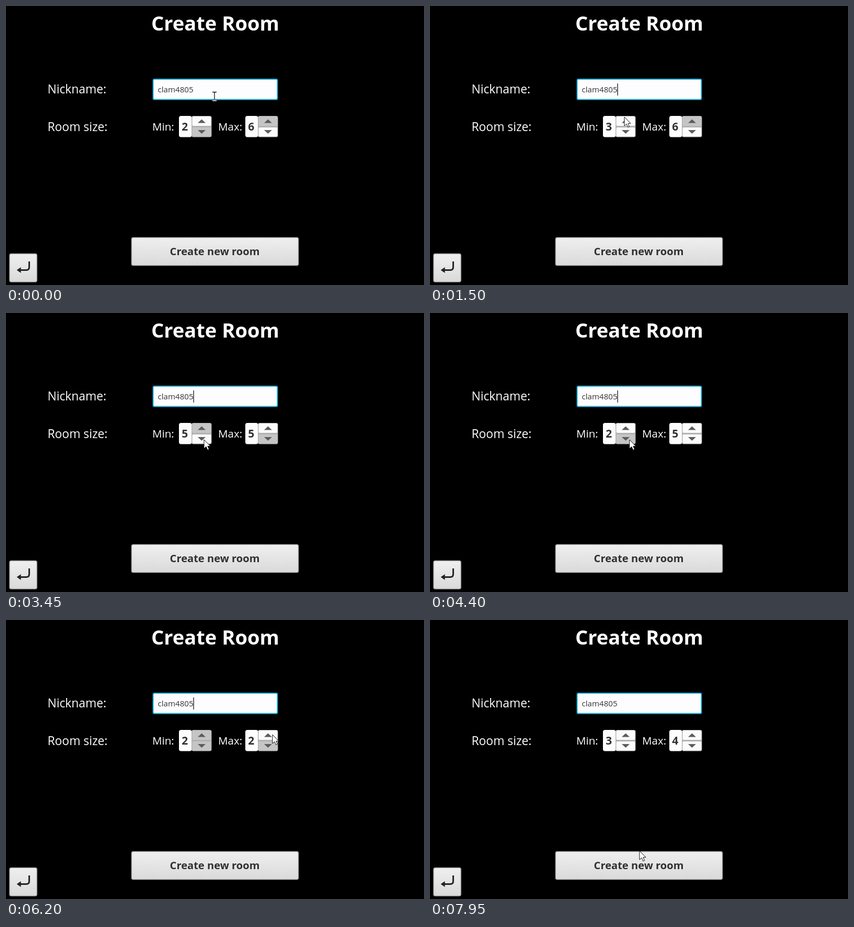
Animation of 800 by 533 pixels, one loop 8000 ms. Source, as an HTML page:

```html
<!DOCTYPE html>
<html lang="en">
<head>
<meta charset="utf-8">
<title>Create Room</title>
<style>
  html, body { margin: 0; width: 100%; height: 100%; overflow: hidden; background: #000; }
  svg { display: block; width: 100%; height: 100%; }
  text { font-family: "Open Sans", "Noto Sans", sans-serif; fill: #fff; }
  .title { font-size: 38.1px; font-weight: 700; }
  .label { font-size: 22.8px; }
  .bound { font-size: 20.5px; }
  .value { font-size: 21px; font-weight: 700; fill: #333; }
  .name { font-size: 15.1px; fill: #333; }
  .action { font-size: 20.1px; font-weight: 700; fill: #303030; }
  .mid { text-anchor: middle; }
  .step { fill: #fbfbfb; }
  .step.off { fill: #c5c5c5; }
  .arrow { fill: #5c5c5c; }
  .panel { fill: url(#face); stroke: #b2b2b2; stroke-width: 1.5; }
  #ibeam { mix-blend-mode: difference; }
</style>
</head>
<body>
<svg viewBox="0 0 800 533" preserveAspectRatio="none">
  <defs>
    <linearGradient id="face" x2="0" y2="1">
      <stop offset="0" stop-color="#efefef"/>
      <stop offset="1" stop-color="#dadada"/>
    </linearGradient>
    <g id="frame">
      <rect x="331" y="210" width="24.5" height="40.5" rx="4" fill="#fdfdfd"/>
      <rect x="355" y="210" width="38.5" height="40.5" rx="3.5" fill="#b3b3b3"/>
    </g>
    <g id="arrows" class="arrow">
      <path d="M367 223.5L374.5 216.5L382 223.5Z"/>
      <path d="M367 237L374.5 244L382 237Z"/>
    </g>
  </defs>

  <rect width="800" height="533"/>
  <text class="title mid" x="400.5" y="47">Create Room</text>

  <text class="label" x="79.5" y="167">Nickname:</text>
  <rect x="280.5" y="138.7" width="240" height="41" rx="3.5" fill="#1599c2"/>
  <rect x="281.5" y="139.7" width="238" height="39" rx="2.5" fill="#3cc1e4"/>
  <rect x="282.7" y="140.9" width="235.6" height="36.6" rx="1.5" fill="#fdfcfe"/>
  <text class="name" x="290.6" y="165">clam4805</text>
  <rect id="caret" x="358.4" y="148" width="1.4" height="23" fill="#222"/>

  <text class="label" x="79.5" y="239">Room size:</text>
  <text class="bound" x="280" y="238">Min:</text>
  <g id="min">
    <use href="#frame"/>
    <rect class="step" x="356.5" y="211" width="36" height="18" rx="2"/>
    <rect class="step" x="356.5" y="232" width="36" height="17.5" rx="2"/>
    <use href="#arrows"/>
    <text class="value mid" x="342.2" y="238"></text>
  </g>
  <text class="bound" x="406" y="238">Max:</text>
  <g id="max" transform="translate(127)">
    <use href="#frame"/>
    <rect class="step" x="356.5" y="211" width="36" height="18" rx="2"/>
    <rect class="step" x="356.5" y="232" width="36" height="17.5" rx="2"/>
    <use href="#arrows"/>
    <text class="value mid" x="342.2" y="238"></text>
  </g>

  <rect class="panel" x="240.5" y="442.5" width="319" height="53" rx="3"/>
  <text class="action mid" x="399.5" y="476">Create new room</text>

  <rect class="panel" x="7" y="473.5" width="52" height="53.5" rx="3"/>
  <path d="M44.4 488V499Q44.4 504.5 39 504.5H26" fill="none" stroke="#222" stroke-width="3"/>
  <path d="M20.5 504.5L28.5 499V510Z" fill="#222"/>

  <path id="ibeam" d="M-4 -7.5H-1L0 -6.5L1 -7.5H4M0 -6.5V8M-4 9H-1L0 8L1 9H4"
        fill="none" stroke="#eee" stroke-width="1.3"/>
  <path id="pointer" d="M0 0V17L4 13.3L6.8 19.6L9.6 18.4L6.9 12.3H12Z"
        fill="#fff" stroke="#111" stroke-width="1"/>
</svg>
<script>
const LOOP = 8000, TICK = 50;
const LOWEST = 2, HIGHEST = 6;
const $ = id => document.getElementById(id);

const spots = {
  field: [399, 172],
  minUp: [372, 212],
  minDown: [379, 242],
  maxUp: [510, 219],
  maxDown: [499, 238],
  belowMax: [503, 247.5],
  create: [401, 441]
};

// Each visit moves the mouse to a spot, then clicks at a steady pace.
const visits = [
  { spot: "minUp", leave: 150, arrive: 650, click: { min: 1 }, first: 1250, every: 350, count: 3 },
  { spot: "maxDown", leave: 1950, arrive: 2650, dip: 29, click: { max: -1 }, first: 2700, count: 1 },
  { spot: "minDown", leave: 2900, arrive: 3250, click: { min: -1 }, first: 3500, every: 250, count: 3 },
  { spot: "belowMax", leave: 4350, arrive: 4900 },
  { spot: "maxDown", leave: 5000, arrive: 5100, click: { max: -1 }, first: 5350, every: 175, count: 3 },
  { spot: "maxUp", leave: 5900, arrive: 6200, click: { max: 1 }, first: 6400, every: 200, count: 2 },
  { spot: "minUp", leave: 6850, arrive: 7400, dip: 29, click: { min: 1 }, first: 7550, count: 1 },
  { spot: "create", leave: 7550, arrive: 7950 }
];

const clamp = (v, low, high) => Math.min(high, Math.max(low, v));
const ease = k => k * k * (3 - 2 * k);

function mouseAt(t) {
  let [x, y] = spots.field;
  for (const { spot, leave, arrive, dip = 0 } of visits) {
    const k = ease(clamp((t - leave) / (arrive - leave), 0, 1));
    const [toX, toY] = spots[spot];
    x += (toX - x) * k;
    y += (toY - y) * k + dip * 4 * k * (1 - k);
  }
  return [x, y];
}

function roomAt(t) {
  const room = { min: LOWEST, max: HIGHEST };
  for (const { click, first, every = LOOP, count } of visits) {
    if (!click || t < first) continue;
    const done = Math.min(count, Math.floor((t - first) / every) + 1);
    for (const side in click) room[side] += click[side] * done;
  }
  return room;
}

function drawSpinner(id, value, low, high) {
  const [up, down] = $(id).querySelectorAll(".step");
  $(id).querySelector("text").textContent = value;
  up.classList.toggle("off", value >= high);
  down.classList.toggle("off", value <= low);
}

function show(id, shown) {
  $(id).style.visibility = shown ? "visible" : "hidden";
}

function draw(t) {
  const { min, max } = roomAt(t);
  drawSpinner("min", min, LOWEST, max);
  drawSpinner("max", max, min, HIGHEST);
  show("caret", (t + 950) % 1000 < 500);

  const [x, y] = mouseAt(t);
  const inField = x > 281 && x < 520 && y > 139 && y < 179;
  show("ibeam", inField);
  show("pointer", !inField);
  for (const id of ["ibeam", "pointer"]) $(id).setAttribute("transform", `translate(${x} ${y})`);
}

let begin;
function play(now) {
  begin ??= now;
  draw(Math.floor((now - begin + 0.5) / TICK) * TICK % LOOP);
  requestAnimationFrame(play);
}
draw(0);
requestAnimationFrame(play);
</script>
</body>
</html>
```
